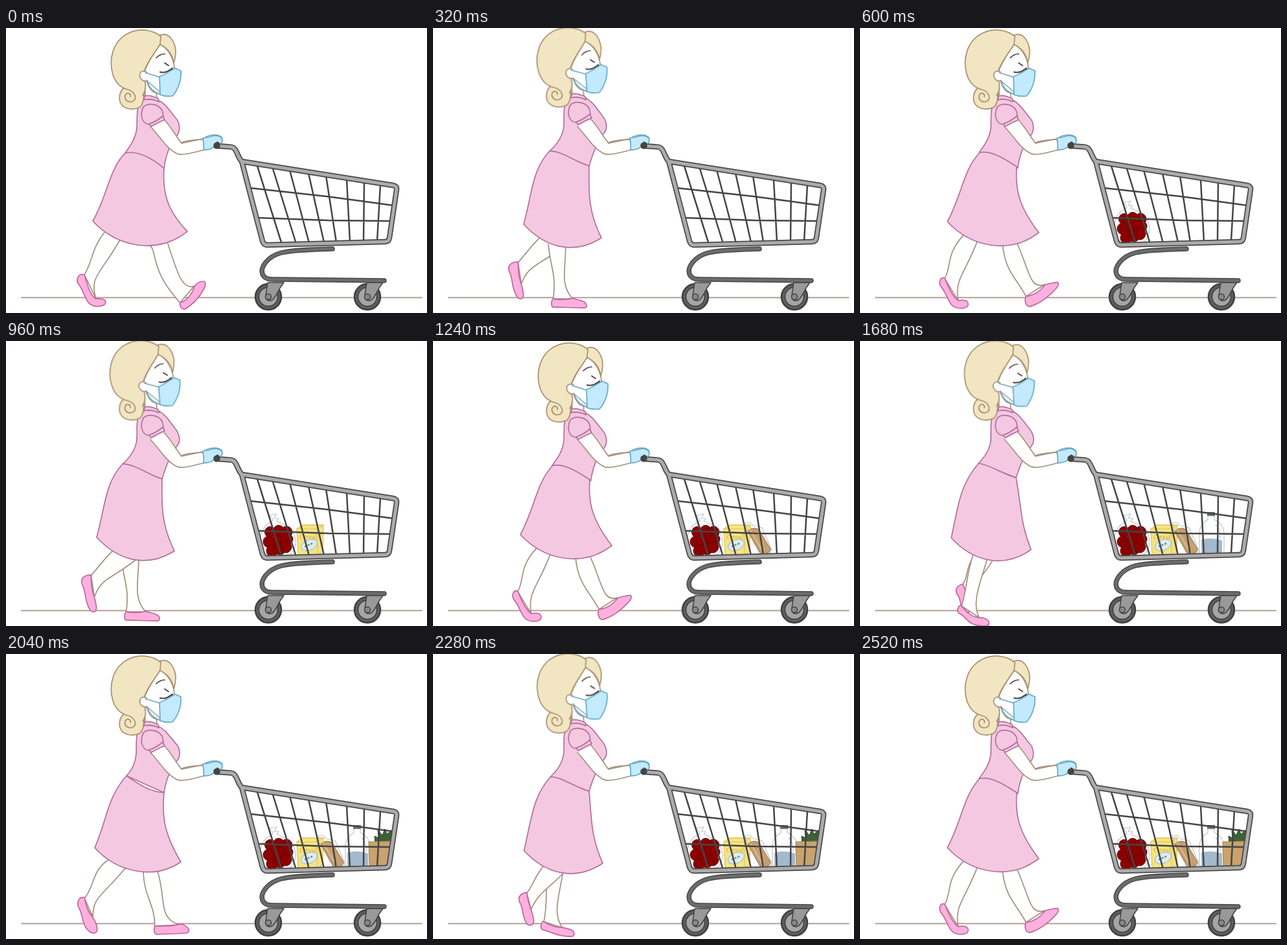
These frames come from a looping animation (650 px wide and 440 px high, 2560 ms). An HTML page:

```html
<!DOCTYPE html>
<html lang="en">
<head>
<meta charset="utf-8">
<title>Walking with a shopping cart</title>
<style>
  html, body { margin: 0; width: 100%; height: 100%; overflow: hidden; background: #fff; }
  svg { display: block; width: 650px; height: 440px; }
  path, circle, ellipse { stroke-linecap: round; stroke-linejoin: round; }

  .line { fill: none; stroke: #a4907e; stroke-width: 1.7; }
  .skin { fill: #fff; stroke: #a4907e; stroke-width: 1.7; }
  .hair { fill: #f2e5c1; stroke: #a6906f; stroke-width: 1.7; }
  .dress { fill: #f5c8e2; stroke: #b0709b; stroke-width: 1.7; }
  .shoe { fill: #ffb0de; stroke: #bb699c; stroke-width: 1.7; }
  .blue { fill: #c3eaff; stroke: #62a9cb; stroke-width: 1.7; }
  .strap { fill: none; stroke: #6fa6c0; stroke-width: 1.5; }
  .ink { fill: none; stroke: #4b3b35; stroke-width: 1.7; }
  .wire { fill: none; stroke: #454545; stroke-width: 2.5; }
  .rim { fill: none; stroke: #484848; stroke-width: 8.5; }
  .steel { fill: none; stroke: #ababab; stroke-width: 5; }
  .rod { fill: none; stroke: #6c6c6c; stroke-width: 4.5; }
  .clear { fill: none; stroke: #bcc6cf; stroke-width: 1.2; }

  /* One step takes 640 ms; each leg needs two steps, half a cycle apart. */
  .leg { animation: leg 1280ms linear infinite; }
  .shoe { animation: shoe 1280ms linear infinite; }
  .far > * { animation-delay: -640ms; }
  .skirt { animation: skirt 640ms linear infinite; }
  .torso { animation: torso 640ms linear infinite; }
  .head { transform-origin: 190px 110px; animation: head 640ms linear infinite; }
  .sleeve { animation: sleeve 640ms linear infinite; }

  @keyframes leg {
    0%, 100% { d: path("M221,334 C235,345 221,372 269,424 L291,398 C272,406 264,375 250,333"); }
    9.375% { d: path("M212,334 C213,376 230,385 230,420 L268,418 C234,408 248,378 234,335"); }
    25% { d: path("M178,334 C182,372 191,380 186,418 L216,418 C196,396 205,372 205,336"); }
    31.25% { d: path("M176,326 C164,360 165,385 157,409 L184,427 C172,402 186,375 197,334"); }
    46.875% { d: path("M160,320 C132,350 142,368 131,387 L152,421 C146,388 162,380 181,330"); }
    50% { d: path("M153,314 C133,338 133,362 121,381 L139,418 C128,384 146,380 176,327"); }
    59.375% { d: path("M158,318 C132,334 136,362 121,377 L134,406 C134,375 148,374 184,331"); }
    75% { d: path("M168,320 C146,342 145,346 131,362 L136,395 C148,364 160,370 204,335"); }
    81.25% { d: path("M178,328 C160,355 168,362 158,376 L166,394 C176,372 200,352 207,333"); }
    89.0625% { d: path("M200,330 C212,362 200,380 203,400 L231,406 C222,388 238,366 230,334"); }
    96.875% { d: path("M220,334 C224,376 240,384 256,414 L285,396 C262,404 262,376 243,334"); }
  }
  @keyframes shoe {
    0%, 100% { d: path("M269,424 C268,430 272,435 277,434 C288,427 298,417 305,404 C309,397 309,391 305,391 C298,391 294,394 291,399 C288,411 278,422 269,424Z"); }
    9.375% { d: path("M230,420 C228,424 229,432 232,433 C246,432 262,432 278,431 C285,429 283,424 279,421 C276,418 272,417 269,417 C257,421 243,420 230,420Z"); }
    25% { d: path("M186,418 C182,422 183,431 186,431 C200,431 220,432 234,432 C240,432 238,424 232,422 C226,419 220,419 216,417 C206,420 196,420 186,418Z"); }
    31.25% { d: path("M156,408 C149,411 150,419 154,421 C166,426 165,441 195,440 C202,438 200,431 194,429 C190,427 187,427 183,427 C170,425 163,417 156,408Z"); }
    46.875% { d: path("M131,386 C123,384 122,394 125,399 C138,414 136,433 156,433 C170,433 169,424 164,421 C160,420 156,420 152,421 C142,413 137,400 131,386Z"); }
    50% { d: path("M121,381 C112,378 108,388 111,394 C124,410 121,429 141,430 C156,429 156,422 151,419 C147,418 141,418 138,418 C130,412 126,398 121,381Z"); }
    59.375% { d: path("M121,376 C112,374 109,384 112,391 C120,405 117,422 131,430 C140,433 142,428 140,419 C138,413 136,409 133,405 C126,398 124,389 121,376Z"); }
    75% { d: path("M131,361 C122,361 114,365 117,375 C124,388 120,402 130,416 C137,421 140,416 139,409 C138,403 137,398 135,392 C132,385 131,375 131,361Z"); }
    81.25% { d: path("M158,375 C149,377 146,384 149,390 C156,396 152,408 160,418 C167,422 172,416 171,410 C169,404 168,398 166,394 C163,388 161,382 158,375Z"); }
    89.0625% { d: path("M203,400 C200,405 201,412 205,414 C216,418 228,421 242,422 C249,421 248,414 243,411 C239,408 235,407 231,406 C221,407 211,404 203,400Z"); }
    96.875% { d: path("M256,414 C253,420 255,430 262,430 C276,426 290,416 302,403 C308,397 307,391 302,393 C296,394 290,394 285,397 C278,406 268,413 256,414Z"); }
  }
  @keyframes skirt {
    0%, 100% { d: path("M184,193 C158,220 158,256 134,298 C172,340 236,350 280,314 C250,283 241,255 244,217 C228,202 205,189 184,193Z"); }
    18.75% { d: path("M186,188 C156,222 156,256 137,299 C170,336 228,350 270,321 C246,280 240,255 244,214 C220,213 203,199 186,188Z"); }
    50% { d: path("M180,190 C153,218 153,256 140,303 C172,338 216,352 260,324 C240,285 240,255 241,213 C222,208 198,189 180,190Z"); }
    62.5% { d: path("M183,189 C155,222 152,250 141,304 C172,338 220,354 264,322 C248,282 250,262 241,211 C222,206 198,190 183,189Z"); }
    93.75% { d: path("M185,192 C159,220 158,256 135,299 C172,339 232,350 276,316 C247,278 239,252 242,214 C226,204 205,189 185,192Z"); }
  }
  @keyframes torso {
    0%, 100% { d: path("M213,110 C200,115 203,135 202,155 C200,172 190,184 184,193 L244,217 C246,200 252,180 264,166 C270,158 268,145 262,139 C252,127 246,116 234,111Z"); }
    18.75% { d: path("M213,110 C198,117 202,135 201,155 C199,172 192,182 186,188 L244,214 C246,200 252,180 264,165 C270,158 269,146 263,139 C252,127 246,116 234,111Z"); }
    50% { d: path("M213,107 C199,112 203,132 202,152 C200,170 189,182 180,190 L241,213 C246,196 252,178 264,162 C271,154 267,142 261,135 C252,123 246,113 234,107Z"); }
    62.5% { d: path("M213,107 C199,112 203,132 202,153 C200,170 191,180 183,189 L241,211 C246,196 252,178 264,163 C271,155 268,144 262,136 C252,124 246,113 234,107Z"); }
  }
  @keyframes head {
    0%, 18.75%, 93.75%, 100% { transform: none; }
    50% { transform: translateY(-3px) rotate(-2deg); }
    62.5% { transform: translateY(-3px) rotate(-1.3deg); }
  }
  @keyframes sleeve {
    0%, 18.75%, 93.75%, 100% { transform: none; }
    50%, 62.5% { transform: translateY(-3px); }
  }

  /* Groceries pop in one after another, 400 ms apart. */
  .item { animation: 2560ms step-end infinite; }
  .fruit { animation-name: in1; }
  .box { animation-name: in2; }
  .bread { animation-name: in3; }
  .bottle { animation-name: in4; }
  .bag { animation-name: in5; }
  @keyframes in1 { 0% { opacity: 0; } 15.625% { opacity: 1; } }
  @keyframes in2 { 0% { opacity: 0; } 31.25% { opacity: 1; } }
  @keyframes in3 { 0% { opacity: 0; } 46.875% { opacity: 1; } }
  @keyframes in4 { 0% { opacity: 0; } 62.5% { opacity: 1; } }
  @keyframes in5 { 0% { opacity: 0; } 78.125% { opacity: 1; } }
</style>
</head>
<body>
<svg viewBox="0 0 650 440">
  <defs>
    <path id="basket" d="M327,182 C341,184 350,181 354,188 C358,194 359,201 364,206 L598,243 Q604,244 603,250 L592,324 Q591,330 585,330 L403,335 Q398,335 396,329 L364,206"/>
    <path id="base" d="M504,341 C468,342 440,343 425,347 C403,353 392,370 396,380 C399,387 405,388 412,388 L584,390"/>
    <g id="wheel" stroke="#404040">
      <circle r="20" fill="#5e5e5e" stroke-width="2.5"/>
      <circle r="14.5" fill="#a5a5a5" stroke-width="1.5"/>
      <path d="M-1,-22 L24,-22 L19,-15 C15,-9 12,0 6,5 C0,8 -5,4 -4,-2Z" fill="#999" stroke-width="1.5"/>
      <circle r="4.5" fill="#888" stroke-width="1.5"/>
    </g>
  </defs>

  <path class="line" d="M24,416.3H642" style="stroke:#b3a296;stroke-width:2"/>

  <g class="far"><path class="skin leg"/><path class="shoe"/></g>
  <g><path class="skin leg"/><path class="shoe"/></g>

  <path class="dress torso"/>
  <path class="dress skirt"/>

  <g class="head">
    <path class="skin" d="M214,80 L215,107 L233,110 L232,96"/>
    <path class="hair" d="M183,92 C174,98 173,112 179,119 C186,127 200,126 207,122 C214,115 212,104 214,95Z"/>
    <path class="skin" d="M238,25 C228,40 219,52 214,67 C216,82 220,94 228,99 L240,103 L260,62 C259,48 252,33 238,25Z"/>
    <path class="hair" d="M238,11 C251,6 260,19 262,34 C262,42 261,48 259,54 C257,41 250,31 237,25Z"/>
    <path class="hair" d="M239,13 C226,2 205,0 189,8 C165,20 158,48 165,72 C169,84 176,92 188,95 C199,98 200,104 197,110 C193,116 182,113 183,105 C185,98 193,98 193,105 C200,101 206,106 211,104 C217,95 216,86 213,79 L213,68 C218,51 229,40 238,25Z" style="stroke:none"/>
    <path class="line" style="stroke:#a6906f" d="M239,13 C226,2 205,0 189,8 C165,20 158,48 165,72 C169,84 176,92 188,95 C199,98 203,109 196,113 C189,116 182,111 184,104 C187,98 193,101 192,106 M211,104 C217,95 216,86 213,79 M213,68 C218,51 229,40 238,25 L239,13"/>
    <path class="skin" d="M217,68 C209,64 205,70 207,76 C209,81 214,83 218,81"/>
    <path class="strap" d="M215,69 L238,76 M218,82 C221,92 228,99 238,102 M218,82 L238,99"/>
    <path class="ink" d="M232,46 C236,42 240,40 245,40 M245,54 L251,58"/>
    <path class="ink" d="M238,68 C245,70 251,67 257,62 M252,65 L258,64" style="stroke-width:2.1"/>
    <path class="blue" d="M237,75 C246,72 254,66 261,62 L270,66 C271,80 266,95 257,105 C250,106 243,105 238,103Z"/>
  </g>

  <path class="skin" d="M223,152 C238,168 246,184 262,193 C270,198 285,193 307,188 L304,171 L271,178 C262,166 254,152 244,141"/>
  <path class="line" d="M271,177 C280,173 290,173 304,172"/>
  <g class="sleeve">
    <path class="dress" d="M214,105 C221,103 229,106 235,109 L236,114 C228,110 220,109 213,111Z"/>
    <path class="dress" d="M222,149 C208,148 207,132 212,122 C220,114 236,118 241,127 C243,132 243,135 243,138Z"/>
    <path class="dress" d="M221,148 C228,146 236,141 242,136 L245,142 C238,144 230,149 224,152Z"/>
  </g>

  <g class="item fruit">
    <path class="clear" style="fill:#fff" d="M412,278 C396,284 390,300 394,318 C399,334 414,336 430,334 C445,330 449,315 446,303 C442,288 430,283 418,278 L421,274 L414,274 L418,267 L407,269 L411,274Z"/>
    <g fill="#8b0000" stroke="#6f0000" stroke-width="1">
      <circle cx="408" cy="295" r="8.5"/><circle cx="421" cy="293" r="8.5"/><circle cx="433" cy="295" r="9"/>
      <circle cx="406" cy="310" r="9"/><circle cx="420" cy="308" r="9"/><circle cx="434" cy="306" r="9"/>
      <circle cx="411" cy="324" r="9"/><circle cx="423" cy="321" r="9"/><circle cx="432" cy="318" r="9"/>
    </g>
  </g>
  <g class="item box">
    <path d="M449,290 L458,284 H490 L489,325 L481,331 H451Z" fill="#f6e384" stroke="#dfc554" stroke-width="1.3"/>
    <path d="M449,290 H481 L490,284 M481,290 V331" fill="none" stroke="#dfc554"/>
    <text x="453" y="306" font-family="Noto Serif, serif" font-style="italic" font-size="9" fill="#cdb23c">Cereal</text>
    <ellipse cx="468" cy="315" rx="13" ry="8" transform="rotate(-22 468 315)" fill="#d8eef5" stroke="#9db7bd"/>
    <path d="M462,317 L474,312" stroke="#8b8068" stroke-width="2.5" stroke-dasharray="1 4"/>
  </g>
  <g class="item bread">
    <path class="clear" d="M485,291 L482,281 L490,280 L494,285 L508,288 L523,323 Q522,330 506,331Z"/>
    <path d="M486,294 Q494,286 503,291 L521,321 Q521,328 507,330Z" fill="#c69f70" stroke="#a37c50" stroke-width="1.2"/>
    <path d="M490,292 L511,328" fill="none" stroke="#dfc199" stroke-width="1.5"/>
  </g>
  <g class="item bottle">
    <path d="M527,307 Q542,302 559,308 V328 Q543,332 527,328Z" fill="#a3b9cc"/>
    <path class="clear" d="M537,270 V276 C526,282 523,292 524,302 V326 Q525,331 532,331 H555 Q562,330 562,325 V297 C562,286 556,280 547,276 V270Z M549,284 Q557,289 556,305"/>
    <path d="M536,264 H548 V270 H536Z" fill="#6d7277"/>
  </g>
  <g class="item bag">
    <path d="M570,293 L569,281 L575,284 L574,271 L581,280 L585,270 L588,278 L596,272 L594,281 L597,285 L592,293Z" fill="#3d6137" stroke="#2b4928" stroke-width="1"/>
    <path d="M560,290 L596,289 L590,327 L561,328Z" fill="#c9a26e" stroke="#ad8754" stroke-width="1.2"/>
  </g>

  <path class="wire" d="M377,247 L495,260 L555,268 L598,274 M389,293 L498,297 L594,298
    M387,210 L426,334 M411,214 L448,333 M438,219 L468,332 M467,224 L491,331
    M494,228 L510,331 M526,234 L531,330 M553,238 L552,330 M578,242 L573,329"/>
  <use href="#basket" class="rim"/>
  <use href="#basket" class="steel"/>

  <use href="#wheel" x="405" y="415"/>
  <use href="#wheel" x="558" y="415"/>
  <use href="#base" class="rim" style="stroke-width:7.5"/>
  <use href="#base" class="rod"/>

  <path class="blue" d="M304,170 L315,168 C324,164 333,167 334,173 C334,178 330,180 326,178 C322,184 316,189 305,188 C306,182 305,176 304,170Z"/>
  <path class="strap" d="M307,169 C316,164 329,163 334,170"/>
  <circle cx="325.500" cy="181.500" r="5.300" fill="#454545"/>
  <path class="ink" d="M326,176 L329,178"/>
</svg>
</body>
</html>
```
